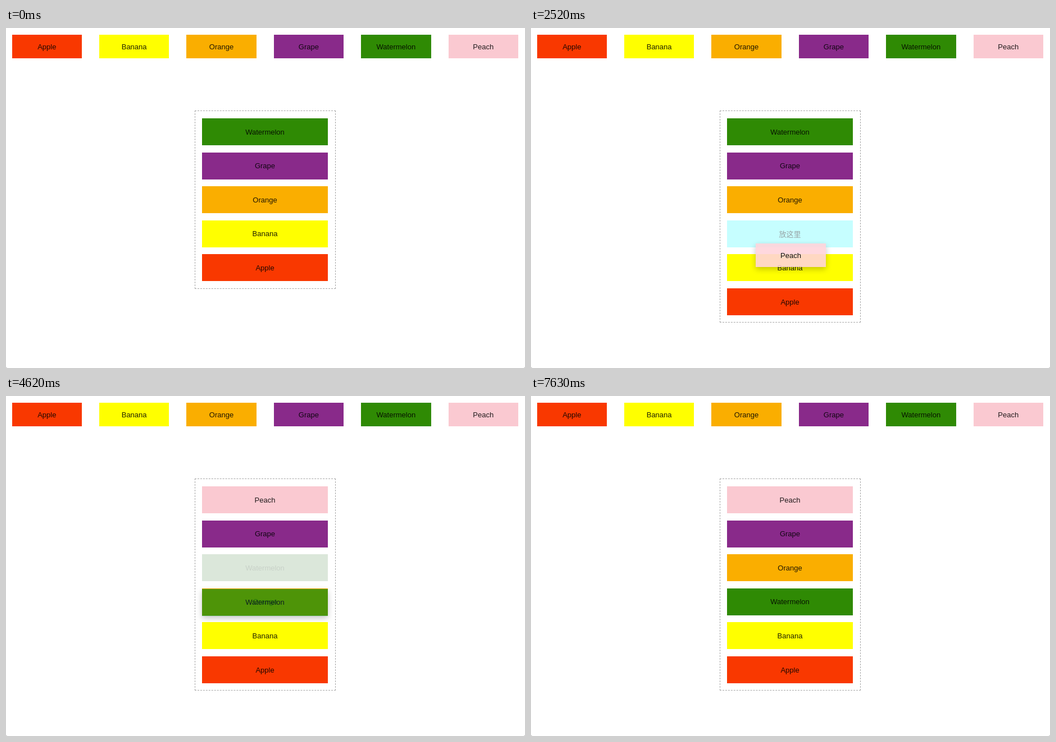
Animation, 924 px wide and 606 px high, one loop 7840 ms. Source, as an HTML page:

```html
<!DOCTYPE html>
<html lang="en">
<head>
<meta charset="utf-8">
<title>Drag and drop list</title>
<style>
  html, body { margin: 0; width: 100%; height: 100%; overflow: hidden; background: #b5b5b5; }
  #stage {
    position: relative; width: 924px; height: 606px; overflow: hidden;
    background: #fff; border-radius: 0 0 3px 3px;
    font: 13px "Liberation Sans", Arial, "Noto Sans CJK SC", "Noto Sans CJK", sans-serif;
    color: rgba(0, 0, 0, .87);
  }
  .box {
    position: absolute; display: flex; align-items: center; justify-content: center;
    white-space: nowrap;
  }
  #frame {
    position: absolute; left: 336px; top: 147px; width: 251px;
    box-sizing: border-box; border: 1px dashed #a6a6a6;
  }
  #tile { box-shadow: 0 4px 10px rgba(0, 0, 0, .22); }
</style>
</head>
<body>
<div id="stage"><div id="frame"></div></div>
<script>
const LOOP = 7840, STEP = 70;
const ROW = { x: 349, y: 161, w: 224, h: 48, pitch: 60.6 };
const PEACH = { lift: 770, drop: 3780 };
const MELON = { lift: 4130, drop: 6580 };

const COLORS = {
  Apple: '#f93800', Banana: '#ffff00', Orange: '#faae00',
  Grape: '#892a8a', Watermelon: '#2f8a04', Peach: '#fac9d1'
};
const START = ['Watermelon', 'Grape', 'Orange', 'Banana', 'Apple'];
const REST = ['Peach', 'Grape', 'Orange', 'Banana', 'Apple'];
const HOLE = { text: '放这里', fill: '#c6feff', ink: '#97a3a5' };
const GHOST = { text: 'Watermelon', fill: '#dbe7da', ink: '#c8d1c8' };

// Only the fill of a dragged tile is see-through
const PEACH_TILE = { text: 'Peach', fill: 'rgba(255, 212, 218, .89)', ink: '#111' };
const MELON_TILE = { text: 'Watermelon', fill: 'rgba(36, 142, 10, .8)', ink: '#0c1c20' };

// Drag paths: time, left, top
const PEACH_PATH = [
  [770, 787, 12], [910, 770, 22], [1260, 560, 110], [1540, 438, 177.4],
  [1960, 418, 265], [2520, 400, 384], [2730, 402, 402], [3150, 412, 270],
  [3500, 421, 158], [3780, 424, 152]
];
const MELON_PATH = [
  [4130, 349, 222], [4270, 349, 226], [4620, 349, 343.5], [4900, 352, 400],
  [5110, 355, 385], [5460, 357, 265], [5740, 358, 190], [5950, 357, 185],
  [6300, 354, 300], [6510, 351, 348], [6580, 350, 350]
];

const stage = document.getElementById('stage');
const frame = document.getElementById('frame');

function addBox(x, y, w, h) {
  const el = document.createElement('div');
  el.className = 'box';
  Object.assign(el.style, { left: x + 'px', top: y + 'px', width: w + 'px', height: h + 'px' });
  stage.append(el);
  return el;
}

function paint(el, { text, fill, ink = '' }) {
  if (el.textContent !== text) el.textContent = text;
  el.style.background = fill;
  el.style.color = ink;
}

const fruit = name => ({ text: name, fill: COLORS[name] });

Object.keys(COLORS).forEach((name, i) =>
  paint(addBox(10.5 + 155.4 * i, 12.4, 124.5, 41.8), fruit(name)));

const rows = Array.from({ length: 6 }, (_, i) =>
  addBox(ROW.x, ROW.y + ROW.pitch * i, ROW.w, ROW.h));

const tile = addBox(0, 0, 0, 0);
tile.id = 'tile';

// Smooth curve through the path points
function along(path, t) {
  const last = path.length - 1;
  t = Math.min(Math.max(t, path[0][0]), path[last][0]);
  let i = 0;
  while (i < last - 1 && t > path[i + 1][0]) i++;
  const a = path[i], b = path[i + 1];
  const span = b[0] - a[0], u = (t - a[0]) / span;
  const slope = (k, axis) => {
    const p = path[Math.max(k - 1, 0)], q = path[Math.min(k + 1, last)];
    return (q[axis] - p[axis]) / (q[0] - p[0]) * span;
  };
  const at = axis => {
    const m = slope(i, axis), n = slope(i + 1, axis), d = b[axis] - a[axis];
    return a[axis] + u * (m + u * (3 * d - 2 * m - n + u * (m + n - 2 * d)));
  };
  return { x: at(1), y: at(2) };
}

const slotAt = y => Math.max(0, Math.min(5, Math.floor((y + 14 - ROW.y) / ROW.pitch)));
const during = (drag, t) => t >= drag.lift && t < drag.drop;

function listAt(t) {
  const list = (t < MELON.lift ? START : REST).map(fruit);
  // The list reacts one step after the pointer
  if (t < PEACH.drop) {
    const p = along(PEACH_PATH, t - STEP);
    if (p.x < 541 && p.y > 133) list.splice(slotAt(p.y), 0, HOLE);
  } else if (t < MELON.lift) {
    list.unshift(fruit('Peach'));
  } else if (t < MELON.drop) {
    list.splice(slotAt(along(MELON_PATH, t - STEP).y), 0, GHOST);
  } else {
    list.splice(3, 0, fruit('Watermelon'));
  }
  return list;
}

function showTile(path, t, w, h, look) {
  const p = along(path, t);
  paint(tile, look);
  Object.assign(tile.style, {
    display: 'flex', left: p.x + 'px', top: p.y + 'px',
    width: w + 'px', height: h + 'px'
  });
}

function draw(now) {
  const t = Math.floor(now % LOOP / STEP) * STEP;
  const list = listAt(t);
  frame.style.height = (list.length === 6 ? 378 : 318) + 'px';
  rows.forEach((row, i) => {
    row.style.display = list[i] ? 'flex' : 'none';
    if (list[i]) paint(row, list[i]);
  });
  if (during(PEACH, t)) {
    showTile(PEACH_PATH, t, 125, 42, PEACH_TILE);
  } else if (during(MELON, t)) {
    showTile(MELON_PATH, t, ROW.w, ROW.h, MELON_TILE);
  } else {
    tile.style.display = 'none';
  }
}

const begin = performance.now();
function tick() {
  draw(performance.now() - begin);
  requestAnimationFrame(tick);
}
tick();
</script>
</body>
</html>
```
